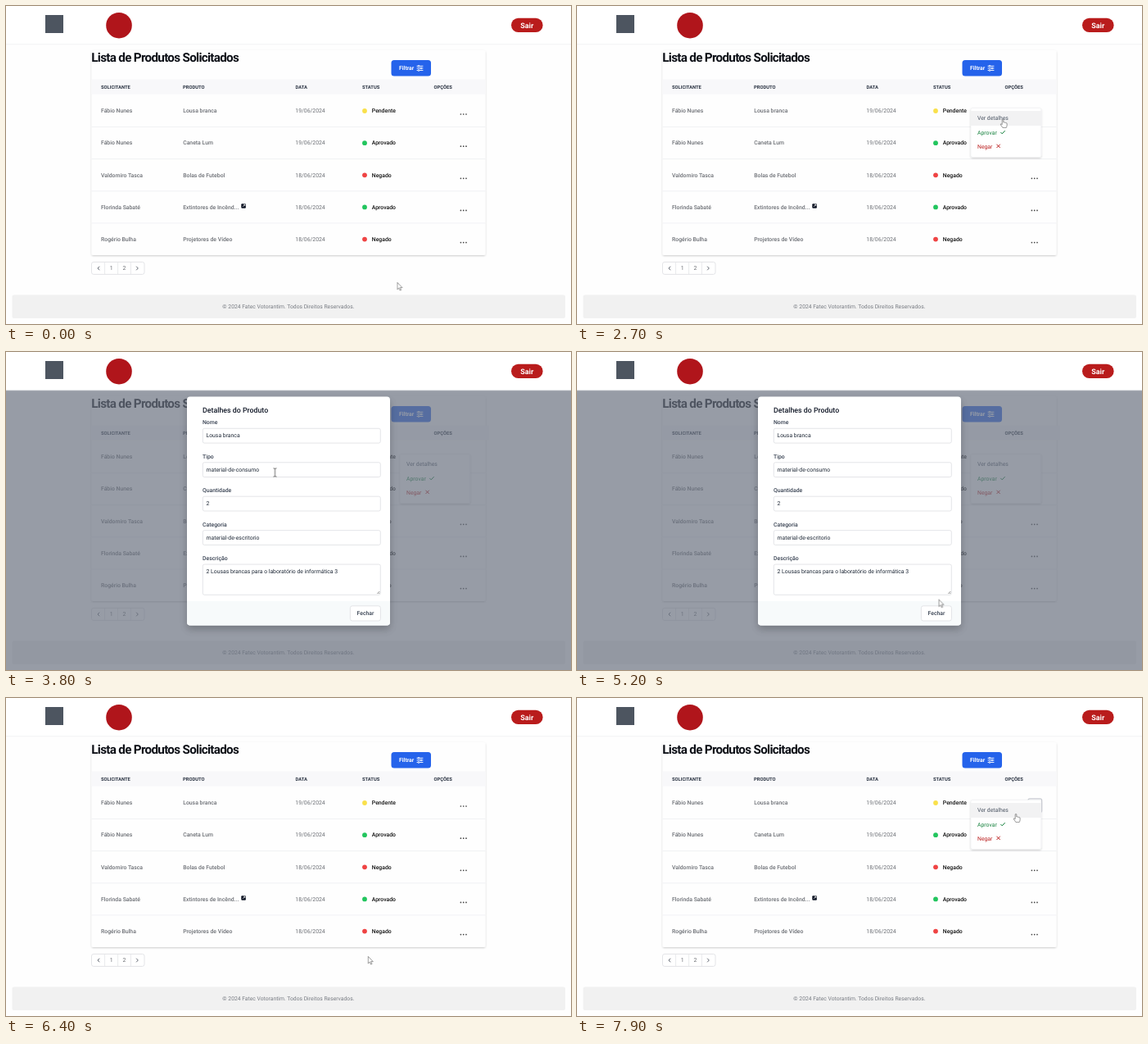
Animation, 690 px wide and 388 px high, one loop 8 s. Source, as an HTML page:

```html
<!DOCTYPE html>
<html lang="pt-BR">
<head>
<meta charset="utf-8">
<title>Lista de Produtos Solicitados</title>
<style>
  html, body { margin: 0; width: 100%; height: 100%; overflow: hidden; background: #fff; }
  svg { display: block; width: 100%; height: 100%; }
  text { font: 400 6.85px Roboto, Arial, sans-serif; text-rendering: geometricPrecision; }
  .title { font-size: 15.2px; font-weight: 600; letter-spacing: -.045em; fill: #0c0f16; }
  .head text { font-size: 5.8px; font-weight: 700; fill: #283140; }
  .cell { fill: #6b6e74; }
  .name { font-weight: 500; fill: #6b6e74; }
  .strong { font-weight: 500; fill: #111; }
  .mid { text-anchor: middle; }
  .label { font-weight: 500; fill: #374151; }
  .value { fill: #1f2937; }
  .field { fill: #fff; stroke: #d8dade; stroke-width: .7; }
  .line { stroke: #eeeff1; stroke-width: .8; }
  .icon { fill: none; stroke-linecap: round; stroke-linejoin: round; }

  .ring, .menu, .hover, .modal, .focus, .arrow, .hand, .beam, .strip {
    animation: 8s step-end -20ms infinite;
  }
  .ring { animation-name: ring; }
  .menu { animation-name: menu; }
  .hover { animation-name: hover; }
  .modal { animation-name: modal; }
  .focus { animation-name: focus; }
  .strip { animation-name: strip; }
  .arrow { animation-name: arrow; }
  .hand { animation-name: hand; }
  .beam { animation-name: beam; }
  .cursor { animation: travel 8s ease-in-out -20ms infinite; }

  @keyframes ring { 0%, 28.75% { opacity: 0 } 21.25%, 92.5%, to { opacity: 1 } }
  @keyframes menu { 0%, 80% { opacity: 0 } 21.25%, 97.5%, to { opacity: 1 } }
  @keyframes hover { 0%, 36.25% { opacity: 0 } 21.25%, 97.5%, to { opacity: 1 } }
  @keyframes modal { 0%, 80%, to { opacity: 0 } 36.25% { opacity: 1 } }
  @keyframes focus { 0%, 80%, to { opacity: 0 } 78.75% { opacity: 1 } }
  @keyframes strip { 0%, 80%, to { width: 482px } 36.25% { width: 486px } }
  @keyframes arrow {
    0%, 36.25%, 63.75%, 80% { opacity: 1 }
    16.25%, 42.5%, 67.5%, 91.25%, to { opacity: 0 }
  }
  @keyframes hand {
    0%, 36.25%, 80% { opacity: 0 }
    16.25%, 67.5%, 91.25%, to { opacity: 1 }
  }
  @keyframes beam { 0%, 63.75%, to { opacity: 0 } 42.5% { opacity: 1 } }
  @keyframes travel {
    0%, 6.25% { transform: translate(477.5px, 337px) }
    17.5%, 26.25% { transform: translate(558.5px, 130px) }
    33.75%, 38.75% { transform: translate(520px, 138px) }
    47.5%, 58.75% { transform: translate(328.5px, 147px) }
    65% { transform: translate(441.5px, 301.5px) }
    68.75%, 82.5% { transform: translate(441.8px, 315px) }
    92.5%, 96.25% { transform: translate(558.5px, 130px) }
    98.75%, to { transform: translate(536px, 141px) }
  }
</style>
</head>
<body>
<svg viewBox="0 0 690 388" preserveAspectRatio="none">
  <defs>
    <filter id="soft" x="-20%" y="-20%" width="140%" height="140%">
      <feDropShadow dx="0" dy="1" stdDeviation="1.2" flood-opacity=".2"/>
    </filter>
    <filter id="deep" x="-20%" y="-20%" width="140%" height="140%">
      <feDropShadow dx="0" dy="5" stdDeviation="5" flood-opacity=".22"/>
    </filter>
  </defs>
  <rect width="690" height="388" fill="#fefefe"/>

  <!-- table card -->
  <rect x="104.5" y="54" width="481" height="250" rx="2" fill="#fefefe" filter="url(#soft)"/>
  <text class="title" x="104.3" y="68.2">Lista de Produtos Solicitados</text>
  <rect x="470.5" y="66" width="48.5" height="19.5" rx="3.5" fill="#2563eb"/>
  <text x="480" y="78" style="font-weight:600" fill="#fff">Filtrar</text>
  <g stroke="#fff" stroke-width=".9" fill="#2563eb">
    <path class="icon" d="M502 73.3h7M502 75.9h7M502 78.5h7"/>
    <circle cx="504" cy="73.3" r=".9"/><circle cx="507" cy="75.9" r=".9"/><circle cx="504" cy="78.5" r=".9"/>
  </g>
  <rect class="strip" x="104" y="89.5" width="482" height="18" fill="#f8f8fa"/>
  <g class="head">
    <text x="116" y="101.2">SOLICITANTE</text>
    <text x="216" y="101.2">PRODUTO</text>
    <text x="353.5" y="101.2">DATA</text>
    <text x="435" y="101.2">STATUS</text>
    <text x="522.5" y="101.2">OPÇÕES</text>
  </g>
  <g id="rows"></g>
  <rect x="287.3" y="241.2" width="5.6" height="5.6" rx="1" fill="#111827"/>
  <path class="icon" d="M289.4 244.6L291.8 242.3M290.3 242.2H291.9V243.8" stroke="#fff" stroke-width=".7"/>

  <!-- pagination -->
  <rect class="field" x="104.5" y="312.4" width="64.5" height="15" rx="2.5"/>
  <path class="line" d="M120.6 312.5v15M136.6 312.5v15M152.4 312.5v15" style="stroke:#e2e4e7"/>
  <path class="icon" d="M113.9 318l-1.9 2 1.9 2M159.4 318l1.9 2-1.9 2" stroke="#555b66" stroke-width=".9"/>
  <text class="cell mid" x="128.6" y="322.3">1</text>
  <text class="cell mid" x="144.4" y="322.3">2</text>

  <rect x="7.5" y="352.5" width="675.5" height="28.5" rx="2" fill="#f1f1f1"/>
  <text class="mid" x="344.9" y="369.4" fill="#777b82" style="font-size:6.77px">© 2024 Fatec Votorantim. Todos Direitos Reservados.</text>

  <!-- options menu -->
  <rect class="ring" x="551" y="122.8" width="16.6" height="16.6" rx="2" fill="#fff" stroke="#c9ccd3" stroke-width="1.3"/>
  <g class="menu">
    <rect x="481" y="124.5" width="85.8" height="60" rx="2" fill="#fff" stroke="#eceef0" stroke-width=".6" filter="url(#soft)"/>
    <rect class="hover" x="481" y="128" width="85.8" height="18" fill="#f2f2f3"/>
    <text x="489" y="139.2" fill="#4b5563">Ver detalhes</text>
    <text x="489" y="156.7" fill="#15803d">Aprovar</text>
    <text x="489" y="174" fill="#b91c1c">Negar</text>
    <path class="icon" d="M517.6 154.2l1.6 1.7 3.2-3.5" stroke="#15803d"/>
    <path class="icon" d="M512.7 169l3.8 3.8M516.5 169l-3.8 3.8" stroke="#b91c1c"/>
  </g>

  <!-- details dialog -->
  <g class="modal">
    <rect y="46" width="690" height="342" fill="#6b7280" fill-opacity=".7"/>
    <rect x="221" y="54.5" width="248" height="279" rx="4" fill="#fff" filter="url(#deep)"/>
    <path d="M221 304h248v25.5a4 4 0 0 1-4 4H225a4 4 0 0 1-4-4z" fill="#f7fafb"/>
    <text x="240" y="74.4" fill="#111827" style="font-size:8.8px;font-weight:500">Detalhes do Produto</text>
    <g id="fields"></g>
    <path d="M453.3 295l3-3M455.2 295l1.1-1.1" stroke="#666" stroke-width=".7"/>
    <rect class="field" x="420.4" y="309.8" width="37" height="18.2" rx="2.5"/>
    <rect class="focus" x="419.3" y="308.7" width="39.4" height="20.4" rx="3.5" fill="none" stroke="#2f66dc" stroke-width="1.5"/>
    <text class="label mid" x="439" y="321.2">Fechar</text>
  </g>

  <!-- top bar -->
  <rect width="690" height="46.5" fill="#fff"/>
  <path class="line" d="M0 46.7h690"/>
  <rect x="48" y="11" width="22" height="22" fill="#4d5560"/>
  <circle cx="138" cy="23.7" r="15.8" fill="#b0151b"/>
  <rect x="617" y="14.8" width="38.6" height="17.2" rx="8.6" fill="#b91c1c"/>
  <text class="mid" x="636.2" y="26.5" fill="#fff" style="font-size:9px;font-weight:600">Sair</text>

  <g class="cursor" fill="#fff" stroke="#555" stroke-width=".6" stroke-linejoin="round">
    <path class="arrow" d="M.4 .3V8.9L2.4 7.1 3.8 10.1 5.1 9.5 3.8 6.6H6.4Z"/>
    <path class="hand" d="M-.8 .9Q0-.4.8.9V4Q1.7 3.4 2.4 4.3 3.3 3.8 3.9 4.7 5.1 4.4 5.1 5.7V7.6Q5 9.3 4.2 10.6H-.1Q-.9 9-2.5 7.1-3.2 5.8-2 5.7L-.8 6.7Z"/>
    <path class="beam" d="M-1.9-5.2Q0-5.2 0-4.2 0-5.2 1.9-5.2M0-4.2V4.2M-1.9 5.2Q0 5.2 0 4.2 0 5.2 1.9 5.2" fill="none" stroke-width=".9"/>
  </g>
</svg>
<script>
  const colors = { Pendente: '#f9e04b', Aprovado: '#22c55e', Negado: '#ef4444' };
  const rows = [
    ['Fábio Nunes', 'Lousa branca', '19/06/2024', 'Pendente'],
    ['Fábio Nunes', 'Caneta Lum', '19/06/2024', 'Aprovado'],
    ['Valdomiro Tasca', 'Bolas de Futebol', '18/06/2024', 'Negado'],
    ['Florinda Sabaté', 'Extintores de Incênd...', '18/06/2024', 'Aprovado'],
    ['Rogério Bulha', 'Projetores de Vídeo', '18/06/2024', 'Negado']
  ];
  const fields = [
    ['Nome', 'Lousa branca'],
    ['Tipo', 'material-de-consumo'],
    ['Quantidade', '2'],
    ['Categoria', 'material-de-escritorio'],
    ['Descrição', '2 Lousas brancas para o laboratório de informática 3']
  ];
  const text = (kind, x, y, content) => `<text class="${kind}" x="${x}" y="${y}">${content}</text>`;

  document.getElementById('rows').innerHTML = rows.map(([person, product, date, status], i) => {
    const y = 128 + i * 39.15;
    const dots = [555.4, 558.7, 562].map(x => `<circle cx="${x}" cy="${y + 4}" r=".85" fill="#444"/>`).join('');
    const line = i < 4 ? `<path class="line" d="M104.5 ${y + 19.5}h481"/>` : '';
    return text('name', 116, y + 2.3, person) + text('name', 216.2, y + 2.3, product) +
      text('cell', 353.3, y + 2.3, date) + text('strong', 446.8, y + 2.3, status) +
      `<circle cx="438" cy="${y}" r="2.9" fill="${colors[status]}"/>` + dots + line;
  }).join('');

  document.getElementById('fields').innerHTML = fields.map(([name, value], i) => {
    const y = 93.3 + i * 41.45;
    const height = i < 4 ? 17.8 : 37.2;
    return text('label', 240, y - 5.1, name) +
      `<rect class="field" x="240.3" y="${y}" width="217" height="${height}" rx="2"/>` +
      text('value', 244.5, y + 11, value);
  }).join('');
</script>
</body>
</html>
```
